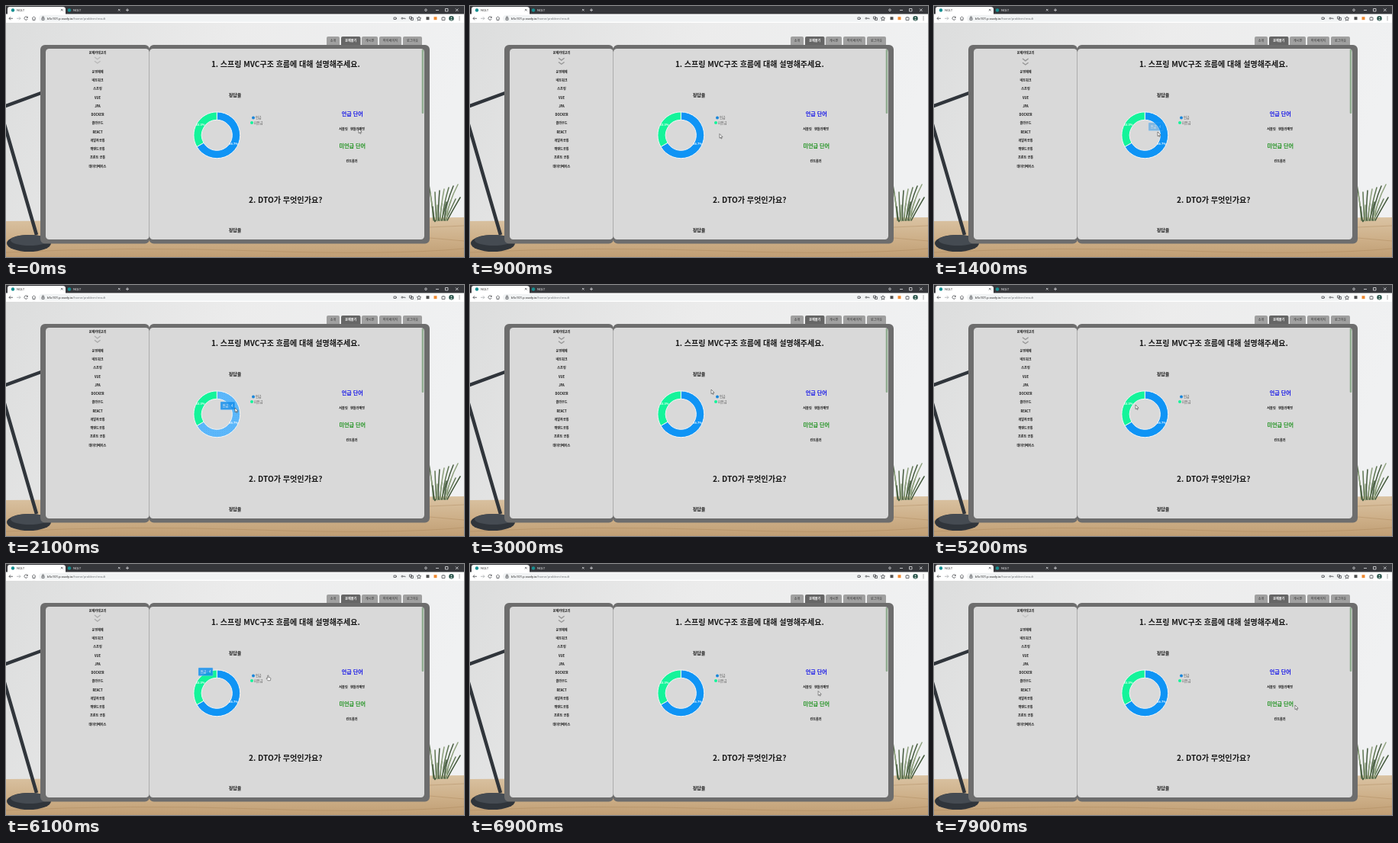
Animation of 600 by 329 pixels, one loop 8000 ms. Source, as an HTML page:

```html
<!DOCTYPE html>
<html lang="ko">
<head>
<meta charset="utf-8">
<style>
html, body { margin: 0; width: 100%; height: 100%; overflow: hidden; background: #e8e8e8; }
svg { display: block; width: 100vw; height: 100vh; }
text { font-family: "Noto Sans CJK KR", "Noto Sans CJK", "Noto Sans", sans-serif; }
.mid { text-anchor: middle; }
.bold { font-weight: 700; }
.ui { font-family: Roboto, "Open Sans", sans-serif; font-size: 4.3px; }
.line { fill: none; stroke: #4d5053; stroke-width: .8; }
</style>
</head>
<body>
<svg viewBox="0 0 600 329" preserveAspectRatio="none">
  <defs>
    <linearGradient id="wall" x2="1" y2=".2">
      <stop offset="0" stop-color="#dcdddd"/><stop offset=".5" stop-color="#ececec"/><stop offset="1" stop-color="#f0f1f2"/>
    </linearGradient>
    <linearGradient id="desk" x2="0" y2="1">
      <stop offset="0" stop-color="#dac3a3"/><stop offset=".5" stop-color="#cdaf88"/><stop offset="1" stop-color="#bd9a6f"/>
    </linearGradient>
    <filter id="soft"><feGaussianBlur stdDeviation=".6"/></filter>
    <pattern id="dots" width="3" height="3" patternUnits="userSpaceOnUse">
      <path d="M0 0H3V3H0Z" fill="#5cb7fa"/><circle cx="1.5" cy="1.5" r=".4" fill="#4aa9f2"/>
    </pattern>
  </defs>

  <!-- room -->
  <path d="M0 22H600V329H0Z" fill="url(#wall)"/>
  <g filter="url(#soft)">
    <path d="M-5 282L605 277V335H-5Z" fill="url(#desk)"/>
    <g fill="none" stroke="#a88559" stroke-width=".7" opacity=".6">
      <path d="M0 323Q160 315 330 321T600 318M555 290L600 288M555 304L600 308"/>
    </g>
    <g fill="none" stroke="#30353b" stroke-width="4.5">
      <path d="M-3 132L46 114M-3 152L40 300"/>
    </g>
    <ellipse cx="30" cy="311" rx="29" ry="11" fill="#30353b"/>
    <ellipse cx="31" cy="307" rx="25" ry="7" fill="#454b52"/>
    <g id="plant" fill="none" stroke-width="1.5" stroke-linecap="round"></g>
  </g>

  <!-- browser -->
  <path d="M0 0H600V11H0Z" fill="#35363a"/>
  <path d="M2 11V4Q2 1 5 1H74Q78 1 78 4V11Z" fill="#fff"/>
  <path d="M0 10.4H600V22H0Z" fill="#fff"/>
  <rect x="43" y="11.8" width="500" height="9" rx="4.5" fill="#f1f3f4"/>
  <circle cx="9" cy="5.5" r="2.2" fill="#168f91"/>
  <circle cx="83" cy="5.5" r="2.2" fill="#168f91"/>
  <text class="ui" x="14" y="7" fill="#444">NQLT</text>
  <text class="ui" x="88" y="7" fill="#dfe1e4">NQLT</text>
  <text class="ui" x="54" y="17.7" fill="#222">k5c101.p.ssafy.io<tspan fill="#73777b">/home/problem/result</tspan></text>
  <g class="line">
    <path d="M72 4l2.5 2.5m0-2.5l-2.5 2.5"/>
    <g stroke="#e2e4e6">
      <path d="M147 4l2.5 2.5m0-2.5l-2.5 2.5M159 3.3v4m-2-2h4M563 5.5h4M575.5 3.5h3.5v3.5h-3.5zM589 3.5l3.5 3.5m0-3.5l-3.5 3.5"/>
      <circle cx="550" cy="5.3" r="1.3"/>
    </g>
    <path d="M9 16.3H4m2-2l-2 2 2 2"/>
    <path d="M14 16.3h5m-2-2l2 2-2 2" stroke="#a9acaf"/>
    <path d="M28 14.7a2.2 2.2 0 1 0 .3 2.2m0-3v1.5h-1.6"/>
    <path d="M34 16.2l2.5-2.2 2.5 2.2M35 16v2.5h3V16"/>
    <path d="M47 16h3v2.3h-3zM47.5 16v-1.3a1 1 0 0 1 2 0V16"/>
    <path d="M508 15h3v2.5h-3zM511.5 15.5v1.5"/>
    <circle cx="519" cy="16.2" r="1"/><path d="M520 16.2h3v1"/>
    <path d="M528.5 14h3v3h-3zM530.5 15.5h3v3h-3z"/>
    <path d="M541 13.8l.8 1.8 2 .2-1.5 1.3.4 2-1.7-1-1.7 1 .4-2-1.5-1.3 2-.2z"/>
    <path d="M571 15h4v3.5h-4zM573 14v1"/>
  </g>
  <path d="M550.5 14.2h4v4h-4z" fill="#505050"/>
  <path d="M560.5 14.2h4v4h-4z" fill="#f08a32"/>
  <circle cx="583.5" cy="16.2" r="3.2" fill="#244f46"/>
  <path d="M581.5 18.5Q583.5 15.5 585.5 18.5Z" fill="#c6d8d0"/>
  <circle cx="583.5" cy="15.3" r="1" fill="#c6d8d0"/>
  <path d="M594 13.7v5" stroke="#555" stroke-width="1" stroke-dasharray="1 1"/>

  <g id="nav"></g>
  <g fill="#6d6d6d">
    <rect x="45" y="51" width="143" height="260.5" rx="6"/>
    <rect x="187.5" y="51" width="367.5" height="260.5" rx="6"/>
  </g>
  <g fill="#d9d9d9">
    <rect x="52" y="56" width="135.6" height="250" rx="4.5"/>
    <rect x="188" y="56" width="360" height="250" rx="4.5"/>
  </g>
  <rect x="544.7" y="57" width="2.5" height="84" rx="1" fill="#91ad91"/>
  <g id="labels"></g>
  <g id="arrows" fill="none" stroke="#949494" stroke-width="1.3"><path/><path/></g>

  <g stroke="#f2f5f7" stroke-width="1">
    <path id="blue"/><path id="green" fill="#14f49a"/>
  </g>
  <g class="mid bold" font-size="3.8" fill="#fff">
    <text x="298" y="182.3">66.7%</text><text x="254.5" y="157.3">33.3%</text>
  </g>
  <circle cx="324" cy="146.5" r="2" fill="#1b86da"/>
  <circle cx="322" cy="153" r="2" fill="#14f49a"/>
  <text x="327" y="148.4" font-size="4.2" fill="#555">언급</text>
  <text x="325" y="154.7" font-size="4.2" fill="#555">미언급</text>

  <g id="tip">
    <rect width="19" height="10.5" rx=".8" fill="#1690ed" stroke="#8ac7f7" stroke-width=".4"/>
    <text class="mid" x="9.5" y="6.8" font-size="4.2" fill="#fff">언급 : 4</text>
  </g>
  <g id="cursor" fill="#fff" stroke="#222" stroke-width=".5" stroke-linejoin="round">
    <path id="pointer" d="M0 0V5.7L1.3 4.5 2.2 6.5 3.1 6.1 2.3 4.2H4.1Z"/>
    <path id="hand" d="M0 0Q.7-.6 1.2 0V2.4L3.7 3Q4.3 3.3 4 4.5L3.5 6.5H.2L-1.6 4Q-1.6 3-.7 3.3L0 4Z"/>
  </g>
</svg>
<script>
const $ = id => document.getElementById(id);
const put = (x, y, size, value, fill = '#171717', cls = 'mid bold') =>
  `<text class="${cls}" x="${x}" y="${y + size * .36}" font-size="${size}" fill="${fill}">${value}</text>`;

$('nav').innerHTML = [[420, 17, '소개'], [439, 25.5, '문제풀기'], [466, 21, '게시판'], [489, 29, '마이페이지'], [520, 25, '로그아웃']]
  .map(([x, w, label], i) => `<path d="M${x} 52V42q0-2 2-2h${w - 4}q2 0 2 2v10z" fill="${i === 1 ? '#666' : '#a0a0a0'}"/>`
    + put(x + w / 2, 45.5, 4.1, label, i === 1 ? '#fff' : '#333', i === 1 ? 'mid bold' : 'mid')).join('');

const topics = ['운영체제', '네트워크', '스프링', 'VUE', 'JPA', 'DOCKER', '클라우드', 'REACT', '개발자공통', '백엔드공통', '프론트 공통', '데이터베이스'];
$('labels').innerHTML = put(120, 61.8, 4.1, '문제카테고리')
  + topics.map((label, i) => put(120, 86.3 + i * 11.27, 4.15, label)).join('')
  + put(366.3, 76.6, 10, '1. 스프링 MVC구조 흐름에 대해 설명해주세요.')
  + put(366.2, 254.2, 10.1, '2. DTO가 무엇인가요?')
  + put(300, 116.5, 6, '정답율') + put(300, 294.2, 6, '정답율')
  + put(453.7, 141.2, 7.1, '언급 단어', '#1818e8') + put(453.7, 183, 7.1, '미언급 단어', '#229322')
  + put(442, 162, 4.1, '서블릿') + put(460.5, 162, 4.1, '핸들러매핑') + put(453, 203.7, 4.1, '컨트롤러');

let blades = '';
for (let i = 0; i < 15; i++) {
  const x = 553 + i * 3, y = 229 + i * 17 % 36;
  blades += `<path d="M${560 + i * 1.3} 281Q${558 + i * 1.6} ${y + 25} ${x} ${y}" stroke="${['#5f7653', '#8da07c', '#43593c'][i % 3]}"/>`;
}
$('plant').innerHTML = blades;

function slice(from, to) {
  const at = (r, a) => `${276.3 + r * Math.sin(a)} ${169.3 - r * Math.cos(a)}`;
  const big = to - from > Math.PI ? 1 : 0;
  return `M${at(30.4, from)}A30.4 30.4 0 ${big} 1 ${at(30.4, to)}L${at(20, to)}A20 20 0 ${big} 0 ${at(20, from)}Z`;
}
const third = Math.PI * 2 / 3;
$('blue').setAttribute('d', slice(0, third * 2));
$('green').setAttribute('d', slice(third * 2, third * 3));

// time, x, y
const route = [
  [0, 462, 161], [300, 489, 172], [600, 440, 165], [1000, 306, 168], [1400, 293, 165],
  [1800, 298, 172], [2100, 300, 161], [2500, 334, 146], [2800, 346, 143], [3000, 316, 137],
  [3500, 300, 190], [3600, 297, 198], [3900, 295.5, 186], [4200, 296, 186], [4400, 296, 186],
  [4800, 274, 170], [5200, 264, 157], [5600, 290, 150], [6000, 342, 146], [6200, 343.5, 146.5],
  [6500, 380, 154], [7000, 465, 168], [7400, 465, 199], [7900, 473, 185], [8000, 473, 185]
];
// start, end, x, y of the highlighted tooltip
const hovers = [[1000, 1300, 281, 153], [1500, 2100, 281, 153], [3500, 4200, 285, 149.5], [5600, 6100, 252, 136]];
const ease = p => p * p * (3 - 2 * p);

function cursorAt(t) {
  const i = route.findIndex(p => p[0] > t), [t0, x0, y0] = route[i - 1], [t1, x1, y1] = route[i];
  const p = ease((t - t0) / (t1 - t0));
  return [x0 + (x1 - x0) * p, y0 + (y1 - y0) * p];
}

function draw(now) {
  const t = Math.floor(now % 8000 / 100) * 100;
  const [x, y] = cursorAt(t);
  $('cursor').setAttribute('transform', `translate(${x} ${y})`);
  const legend = x > 319 && x < 346 && y > 143 && y < 156;
  $('hand').style.display = legend ? '' : 'none';
  $('pointer').style.display = legend ? 'none' : '';

  const hover = hovers.find(h => t >= h[0] && t <= h[1] + 100);
  const lit = hover && t <= hover[1] && t < 5900;
  $('blue').setAttribute('fill', lit ? 'url(#dots)' : '#0f94f5');
  $('tip').style.opacity = !hover ? 0 : t > hover[1] ? .45 : .85;
  if (hover) $('tip').setAttribute('transform', `translate(${hover[2]} ${hover[3]})`);

  const phase = (t + 100) % 2000 / 2000;
  [...$('arrows').children].forEach((arrow, i) => {
    const top = 66.8 + i * 5.2 + 3 * phase;
    arrow.setAttribute('d', `M116 ${top}L119.8 ${top + 2.8} 123.6 ${top}`);
    arrow.style.opacity = i === 1 && phase === 0 ? 0 : Math.min(1, .3 + 1.2 * Math.sin(Math.PI * phase));
  });
}

const start = performance.now();
function loop(now) {
  draw(Math.max(0, now - start));
  requestAnimationFrame(loop);
}
loop(start);
</script>
</body>
</html>
```
